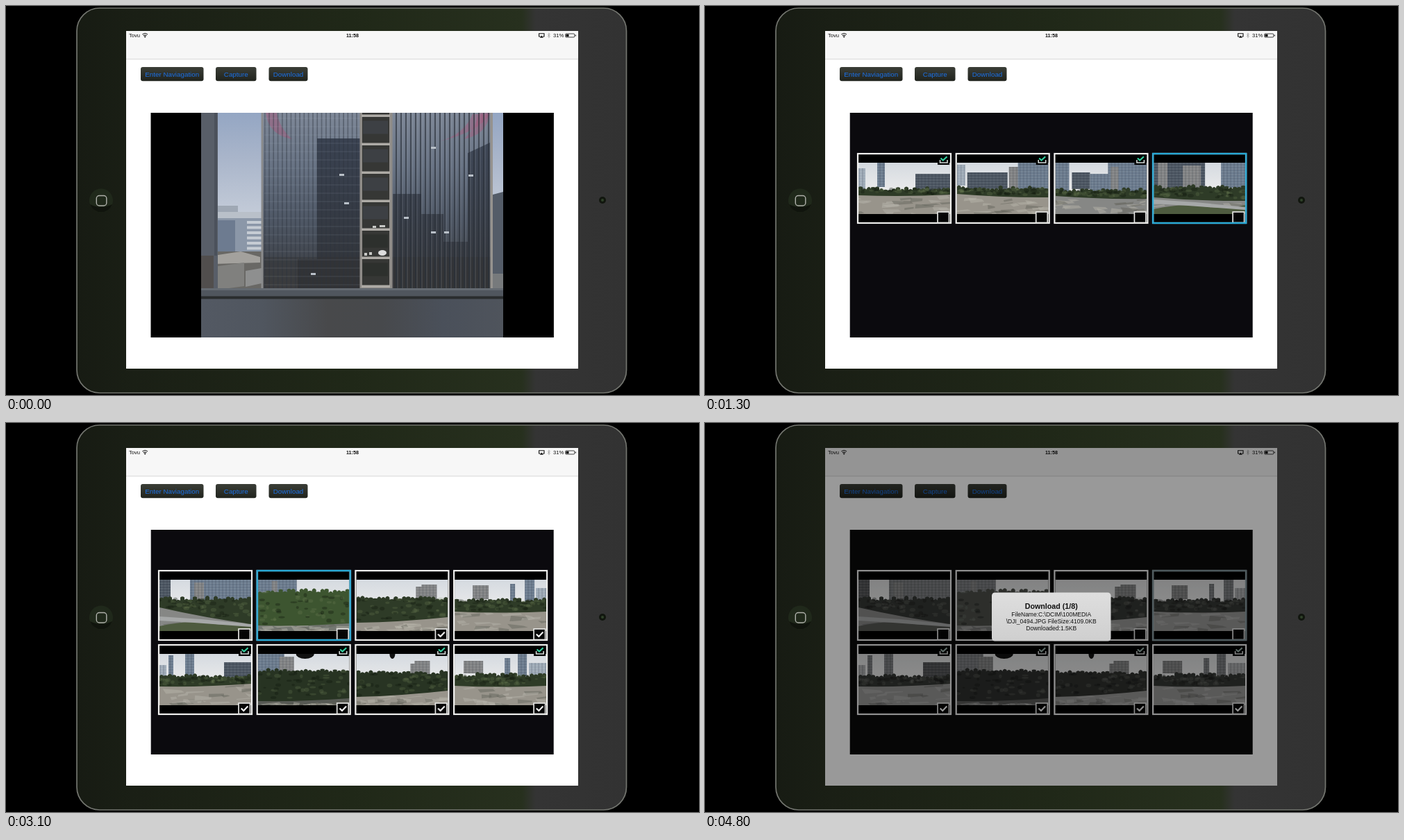
An HTML page for the animation above (5000 ms loop, 998 by 561 pixels).

```html
<!DOCTYPE html>
<html lang="en">
<head>
<meta charset="utf-8">
<title>Media download demo</title>
<style>
html, body { margin: 0; width: 100%; height: 100%; overflow: hidden; background: #000; }
svg { display: block; width: 998px; height: 561px; }
text { font-family: "Liberation Sans", Arial, sans-serif; }
.status { font-size: 7.6px; fill: #111; }
.status .clock { font-size: 7.2px; font-weight: bold; }
.btn text { font-size: 9.8px; fill: #1b70e6; text-anchor: middle; }
.alert text { font-size: 8.5px; fill: #111; text-anchor: middle; }
.alert .title { font-size: 10.7px; font-weight: bold; }
.fade { animation: fade 5s linear infinite; }
.mute { animation: mute 5s linear infinite; }
@keyframes fade { 0%, 88% { opacity: 0; } 92%, 100% { opacity: 1; } }
@keyframes mute { 0%, 88% { filter: grayscale(0); } 92%, 100% { filter: grayscale(.85); } }
</style>
</head>
<body>
<svg id="stage" viewBox="0 0 998 561">
  <defs>
    <linearGradient id="body">
      <stop offset="0" stop-color="#171b13"/><stop offset=".1" stop-color="#1a1f15"/>
      <stop offset=".5" stop-color="#202818"/><stop offset=".81" stop-color="#27301e"/>
      <stop offset=".835" stop-color="#343434"/><stop offset="1" stop-color="#323232"/>
    </linearGradient>
    <linearGradient id="key" x2="0" y2="1">
      <stop offset="0" stop-color="#3b3e37"/><stop offset="1" stop-color="#20231d"/>
    </linearGradient>
    <linearGradient id="sky" x2="0" y2="1">
      <stop offset="0" stop-color="#94a6c3"/><stop offset=".2" stop-color="#a9b5ca"/>
      <stop offset=".45" stop-color="#c3cbd8"/>
    </linearGradient>
    <linearGradient id="glass" x2="0" y2="1">
      <stop offset="0" stop-color="#7e8898"/><stop offset=".3" stop-color="#687384"/>
      <stop offset=".6" stop-color="#4f5866"/><stop offset=".85" stop-color="#40444b"/>
      <stop offset="1" stop-color="#424344"/>
    </linearGradient>
    <linearGradient id="shade" x2="0" y2="1">
      <stop offset="0" stop-color="#323a49"/><stop offset="1" stop-color="#303236"/>
    </linearGradient>
    <linearGradient id="wall">
      <stop offset="0" stop-color="#535963"/><stop offset=".2" stop-color="#50565f"/>
      <stop offset=".42" stop-color="#48494b"/><stop offset=".6" stop-color="#47494c"/>
      <stop offset=".8" stop-color="#4a505a"/><stop offset="1" stop-color="#4f545c"/>
    </linearGradient>
    <linearGradient id="haze" x2="0" y2="1">
      <stop offset="0" stop-color="#d5dae0"/><stop offset=".5" stop-color="#e8e9ea"/>
    </linearGradient>
    <linearGradient id="sheet" x2="0" y2="1">
      <stop offset="0" stop-color="#dedede"/><stop offset="1" stop-color="#cfcfcf"/>
    </linearGradient>
    <pattern id="fins" width="6.3" height="12" patternUnits="userSpaceOnUse">
      <path d="M1 0V12" stroke="#2b313b" stroke-width="1.4" opacity=".5"/>
      <path d="M0 6H6.3" stroke="#a9b4c4" stroke-width=".7" opacity=".2"/>
    </pattern>
    <pattern id="finsWide" width="7" height="12" patternUnits="userSpaceOnUse">
      <path d="M2 0V12" stroke="#292f39" stroke-width="2.2" opacity=".65"/>
      <path d="M4 0V12" stroke="#98a1ae" stroke-width=".8" opacity=".35"/>
    </pattern>
    <pattern id="panes" width="5" height="4" patternUnits="userSpaceOnUse">
      <path d="M0 1H5" stroke="#e6eaee" stroke-width=".7" opacity=".25"/>
      <path d="M1 0V4" stroke="#202a38" stroke-width=".8" opacity=".35"/>
    </pattern>
    <clipPath id="photoClip"><path d="M281 154H716V478H281Z"/></clipPath>
    <clipPath id="thumbClip"><path d="M0 0H132V74H0Z"/></clipPath>
  </defs>

  <rect x="102" y="3" width="791.5" height="555" rx="33" fill="url(#body)" stroke="#73756f" stroke-width="1.7"/>
  <circle cx="137" cy="280.5" r="17" fill="#20291b"/>
  <path d="M121 286A17 17 0 0 0 153 286Q137 294 121 286" fill="#10140d"/>
  <rect x="130.3" y="273.5" width="14.5" height="14.5" rx="4" fill="none" stroke="#aeb0aa" stroke-width="1.4"/>
  <circle cx="859" cy="280" r="5" fill="#11160e"/>
  <circle cx="859" cy="280" r="2" fill="#2f4229"/>

  <path d="M173 36H824V523H173Z" fill="#fff"/>
  <path d="M173 36H824V76.5H173Z" fill="#f7f7f7"/>
  <path d="M173 76.7H824" stroke="#cfcfcf" stroke-width=".8"/>
  <g class="status">
    <text x="177" y="45.3">Tovu</text>
    <text class="clock" x="490" y="45.3">11:58</text>
    <text x="788" y="45.3">31%</text>
  </g>
  <g fill="none" stroke="#111" stroke-width="1.1">
    <path d="M196.5 41.2Q200.2 37.9 203.9 41.2M198 43Q200.2 41 202.4 43"/>
    <path d="M769.5 44H767.6V39.8H775V44H773"/>
    <path d="M780 40.5L783.5 44L781.7 45.7V39L783.5 40.7L780 44.2" stroke="#999" stroke-width=".7"/>
    <rect x="805.7" y="40" width="13" height="5" rx="1" stroke-width=".8"/>
    <path d="M820.3 41.5V43.5"/>
  </g>
  <path d="M200.2 43L201.4 44.5L200.2 45.7L199 44.5ZM768.7 45.8L771.3 42.5L773.9 45.8ZM806.5 40.8H810.5V44.3H806.5Z" fill="#111"/>

  <g id="buttons"></g>
  <g id="panel" class="mute"></g>

  <path class="fade" d="M173 36H824V523H173Z" fill="#000" fill-opacity=".4"/>
  <g class="alert fade">
    <rect x="413" y="244.5" width="171.5" height="70" rx="4.5" fill="url(#sheet)"/>
    <text class="title" x="498.7" y="267.5">Download (1/8)</text>
    <text x="498.7" y="279">FileName:C:\DCIM\100MEDIA</text>
    <text x="498.7" y="289.2">\DJI_0494.JPG FileSize:4109.0KB</text>
    <text x="498.7" y="299.4">Downloaded:1.5KB</text>
  </g>
</svg>

<script>
const LOOP = 5000;
const sheet = document.head.appendChild(document.createElement('style')).sheet;
const byId = id => document.getElementById(id);
let seed = 7, count = 0;
const rnd = (a, b) => {
  seed = (seed * 16807) % 2147483647;
  return a + (b - a) * seed / 2147483647;
};

function add(parent, tag, attrs) {
  const el = document.createElementNS('http://www.w3.org/2000/svg', tag);
  for (const k in attrs) el.setAttribute(k, attrs[k]);
  return parent.appendChild(el);
}
const group = (parent, attrs) => add(parent, 'g', attrs);
const box = (parent, x, y, width, height, fill, more) =>
  add(parent, 'rect', { x, y, width, height, fill, ...more });
const path = (parent, d, fill, more) => add(parent, 'path', { d, fill, ...more });

// Hard changes: steps are [ms, value] pairs.
function steps(el, prop, list) {
  const name = 'step' + count++;
  const last = list[list.length - 1];
  const keys = [...list, [LOOP, last[1]]].map(([t, v]) => `${t / LOOP * 100}%{${prop}:${v}}`);
  sheet.insertRule(`@keyframes ${name}{${keys.join('')}}`, 0);
  el.style.animation = `${name} ${LOOP}ms step-end infinite`;
}
function showFor(el, from, to) {
  const list = from ? [[0, 0], [from, 1]] : [[0, 1]];
  if (to < LOOP) list.push([to, 0]);
  steps(el, 'opacity', list);
}

function button(x, width, label) {
  const g = group(byId('buttons'), { class: 'btn' });
  box(g, x, 88, width, 20.3, 'url(#key)', { rx: 3 });
  add(g, 'text', { x: x + width / 2, y: 101.8 }).textContent = label;
  return g;
}

function livePhoto(parent) {
  const g = group(parent, { 'clip-path': 'url(#photoClip)' });
  box(g, 281, 154, 435, 324, 'url(#sky)');
  // street side on the left
  box(g, 303, 297, 67, 58, '#8b97a8');
  box(g, 303, 297, 67, 9, '#b9c0c9');
  box(g, 304, 288, 30, 9, '#9fa8b4');
  box(g, 304, 309, 26, 45, '#6d7b90');
  for (let i = 0; i < 6; i++) box(g, 347, 310 + i * 7.5, 22, 4, '#c6ccd4');
  box(g, 300, 354, 70, 56, '#696865');
  path(g, 'M299 360L338 354L366 362V370L300 372Z', '#a3a19d');
  path(g, 'M299 376L343 370V404L299 410Z', '#80807e');
  path(g, 'M345 382L368 378V400L345 405Z', '#8e8f8f');
  box(g, 281, 154, 24, 256, '#585e68');
  box(g, 300, 154, 4, 206, '#4b515b');
  path(g, 'M281 360H299V410H281Z', '#514e4d');
  // towers with reflections
  box(g, 368, 154, 333, 256, 'url(#glass)');
  path(g, 'M448 191H511V410H420V365H448Z', 'url(#shade)', { opacity: .88 });
  path(g, 'M557 271H598V300H630V340H665V212L697 197V410H557Z', 'url(#shade)', { opacity: .8 });
  box(g, 372, 362, 326, 47, '#303030', { opacity: .4 });
  for (const [x, flip] of [[374, 1], [697, -1]])
    path(g, `M${x} 154h${16 * flip}q${4 * flip} 22 ${22 * flip} 38q${-34 * flip} -6 ${-38 * flip} -38Z`,
      '#a9547a', { opacity: .45 });
  path(g, 'M625 195Q660 185 672 156H697Q680 182 625 195Z', '#a9547a', { opacity: .45 });
  box(g, 372, 154, 139, 256, 'url(#fins)');
  box(g, 557, 154, 141, 256, 'url(#finsWide)');
  box(g, 367.5, 154, 3, 256, '#8b8c8d');
  box(g, 697.5, 154, 3.5, 256, '#96938f');
  path(g, 'M701 272L716 268V410H701Z', '#545c68');
  box(g, 701, 386, 15, 24, '#777a7c');
  for (const [x, y] of [[480, 242], [487, 283], [573, 304], [612, 325], [631, 325], [666, 243], [612, 203], [439, 385]])
    box(g, x, y, 7, 3, '#b9c0c8');
  // service column
  box(g, 509.5, 154, 47, 256, '#8f8c88');
  box(g, 513, 154, 39, 252, '#363735');
  for (let i = 0; i < 7; i++) {
    const y = 156.5 + i * 41;
    box(g, 514, y + 9, 36, 19, i > 3 ? '#2d302d' : '#3d4044');
    box(g, 512, y, 41, 3.5, '#aeaba6');
  }
  add(g, 'ellipse', { cx: 542, cy: 356, rx: 6, ry: 4, fill: '#ddd' });
  path(g, 'M516 356h4v4h-4ZM523 355h4v4h-4ZM528 317h5v3h-5ZM538 316h8v3h-8Z', '#c7c8c5');
  // sill
  box(g, 281, 407, 435, 13, '#50565e');
  box(g, 281, 407, 435, 3, '#646a71');
  box(g, 281, 419, 435, 60, 'url(#wall)');
  box(g, 281, 418.5, 435, 4, '#2a2d2e');
}

// towers: x, y, w, h, tone; trees: top, bottom at left and right; green: leaf tone
const TONES = ['#6b7b8e', '#9fabb8', '#828384', '#4a5460'];
const FIELD = '#98948b', ROAD = '#868785';
const street = [
  { towers: [[0, 8, 10, 30, 1], [27, 0, 11, 35, 0], [82, 16, 50, 24, 3]], trees: [35, 47, 46], ground: FIELD },
  { towers: [[0, 3, 12, 30, 1], [15, 14, 58, 24, 3], [75, 6, 20, 42, 2], [88, 0, 44, 50, 0]], trees: [34, 45, 50], ground: FIELD },
  { towers: [[0, 0, 20, 48, 0], [24, 14, 26, 24, 3], [50, 16, 32, 34, 0], [76, 0, 56, 52, 0], [80, 6, 11, 48, 2]], trees: [37, 48, 52], ground: ROAD },
  { towers: [[0, 0, 74, 62, 3], [6, 0, 14, 62, 2], [42, 4, 26, 54, 2], [97, 0, 35, 36, 0]], trees: [33, 50, 55], ground: ROAD, lawn: 1 }
];
const park = [
  { towers: [[0, 0, 16, 42, 3], [44, 0, 88, 34, 0], [50, 4, 14, 30, 2]], trees: [25, 40, 64], ground: ROAD, lawn: 1 },
  { towers: [[0, 0, 56, 38, 0], [20, 2, 8, 30, 2]], trees: [14, 66, 63], ground: '#747872', green: '#3d5530' },
  { towers: [[86, 10, 12, 20, 2], [94, 7, 22, 23, 2]], trees: [25, 62, 54], ground: FIELD },
  { towers: [[26, 8, 23, 20, 2], [80, 6, 7, 26, 0], [101, 0, 14, 32, 0], [117, 12, 15, 20, 1]], trees: [27, 46, 46], ground: FIELD },
  { towers: [[0, 16, 10, 16, 1], [13, 2, 7, 30, 0], [37, 0, 13, 33, 0], [93, 12, 39, 24, 3]], trees: [30, 47, 43], ground: FIELD },
  { towers: [[0, 0, 38, 38, 0], [31, 4, 21, 28, 2]], trees: [22, 68, 64], ground: '#575a54', green: '#273322', spot: [68, 13] },
  { towers: [[78, 14, 15, 18, 2], [84, 10, 22, 22, 2]], trees: [25, 62, 53], ground: FIELD, green: '#283423', spot: [52, 4] },
  { towers: [[13, 10, 28, 18, 2], [72, 6, 8, 26, 0], [91, 0, 13, 32, 0], [107, 13, 25, 18, 1]], trees: [28, 46, 46], ground: FIELD }
];

function scene(parent, { towers, trees: [top, left, right], ground, green = '#2e3b27', lawn, spot }) {
  const g = group(parent, { transform: 'translate(2 14)', 'clip-path': 'url(#thumbClip)' });
  box(g, 0, 0, 132, 74, 'url(#haze)');
  for (const [x, y, w, h, tone] of towers) {
    box(g, x, y, w, h, TONES[tone]);
    box(g, x, y, w, h, 'url(#panes)');
  }
  path(g, `M0 ${left - 4}L132 ${right - 4}V74H0Z`, ground);
  for (let i = 0; i < 22; i++) {
    const x = rnd(-10, 125), y = rnd(Math.max(left, right), 74), w = rnd(8, 28);
    path(g, `M${x} ${y}l${w} ${rnd(-3, 3)}l${rnd(-2, 7)} ${rnd(1, 4)}l${-w} 2Z`,
      i % 3 ? '#b9b5ac' : '#5f6158', { opacity: .45 });
  }
  if (lawn) {
    path(g, 'M0 74V67Q40 58 72 63T132 61V74Z', '#4e5b3f');
    path(g, 'M0 53L60 57L132 64V68L50 62L0 59Z', '#a6a8a8');
  }
  let d = `M0 ${left}`;
  for (let x = 0; x < 132; x += 6) d += `V${top + rnd(0, 5)}q3 ${rnd(-5, -1)} 6 0`;
  path(g, d + `V${right}Q66 ${(left + right) / 2 + 3} 0 ${left}Z`, green);
  for (let i = 0; i < 55; i++) {
    const x = rnd(0, 132), end = left + (right - left) * x / 132;
    add(g, 'ellipse', { cx: x, cy: rnd(top + 3, end - 2), rx: rnd(2, 5), ry: rnd(1, 3),
      fill: i % 2 ? '#75885a' : '#10190e', opacity: i % 2 ? .22 : .35 });
  }
  if (spot) add(g, 'ellipse', { cx: spot[0], cy: 0, rx: spot[1], ry: 7, fill: '#111' });
}

const cellAt = i => [219 + (i % 4) * 141.7, i < 4 ? 212 : 319];

function cell(parent, i, info, saved) {
  const [x, y] = cellAt(i);
  const g = group(parent, { transform: `translate(${x} ${y})` });
  box(g, 1, 1, 134, 100, '#000');
  scene(g, info);
  box(g, 1, 1, 134, 100, 'none', { stroke: '#f0f0ee', 'stroke-width': 2.2 });
  if (saved) {
    box(g, 116, 3, 17, 14, '#000');
    path(g, 'M119.5 10V14H130V10', 'none', { stroke: '#d5dcda', 'stroke-width': 1.6 });
    path(g, 'M120.5 7.5L123.8 10.5L129.5 5.2', 'none', { stroke: '#35cf9f', 'stroke-width': 2.2 });
  }
  box(g, 116, 85, 16.5, 15.5, '#050505', { stroke: '#e4e4e2', 'stroke-width': 1.7 });
  return path(g, 'M119.7 92.5L123.2 96L129.3 89.5', 'none', { stroke: '#fff', 'stroke-width': 2 });
}

button(194, 90.5, 'Enter Naviagation');
button(302, 58.5, 'Capture');
steps(button(378.5, 56, 'Download'), 'opacity', [[0, 1], [600, .6], [900, 1], [4200, .6], [4400, 1]]);

const panel = byId('panel');
box(panel, 208.7, 154, 580, 324, '#0b0a0e');
const live = group(panel);
box(live, 208.7, 154, 580, 324, '#000');
livePhoto(live);
showFor(live, 0, 1000);

const first = group(panel);
street.forEach((info, i) => { cell(first, i, info, i < 3).style.opacity = 0; });
showFor(first, 1100, 1700);

const second = group(panel);
const unpick = [2900, 3000, 3400, 3800];
park.forEach((info, i) => showFor(cell(second, i, info, i > 3), 2100 + i * 100, unpick[i] || LOOP));
showFor(second, 1700, LOOP);

const holder = group(panel);
const cursor = box(holder, 1, 1, 134, 100, 'none', { stroke: '#27a9d6', 'stroke-width': 2.4 });
const at = i => 'translate(' + cellAt(i).map(v => v + 'px').join(',') + ')';
steps(cursor, 'transform', [
  [0, at(3)],
  ...park.map((_, i) => [2100 + i * 100, at(i)]),
  ...unpick.map((t, i) => [t, at(i)])
]);
showFor(holder, 1100, LOOP);
</script>
</body>
</html>
```
